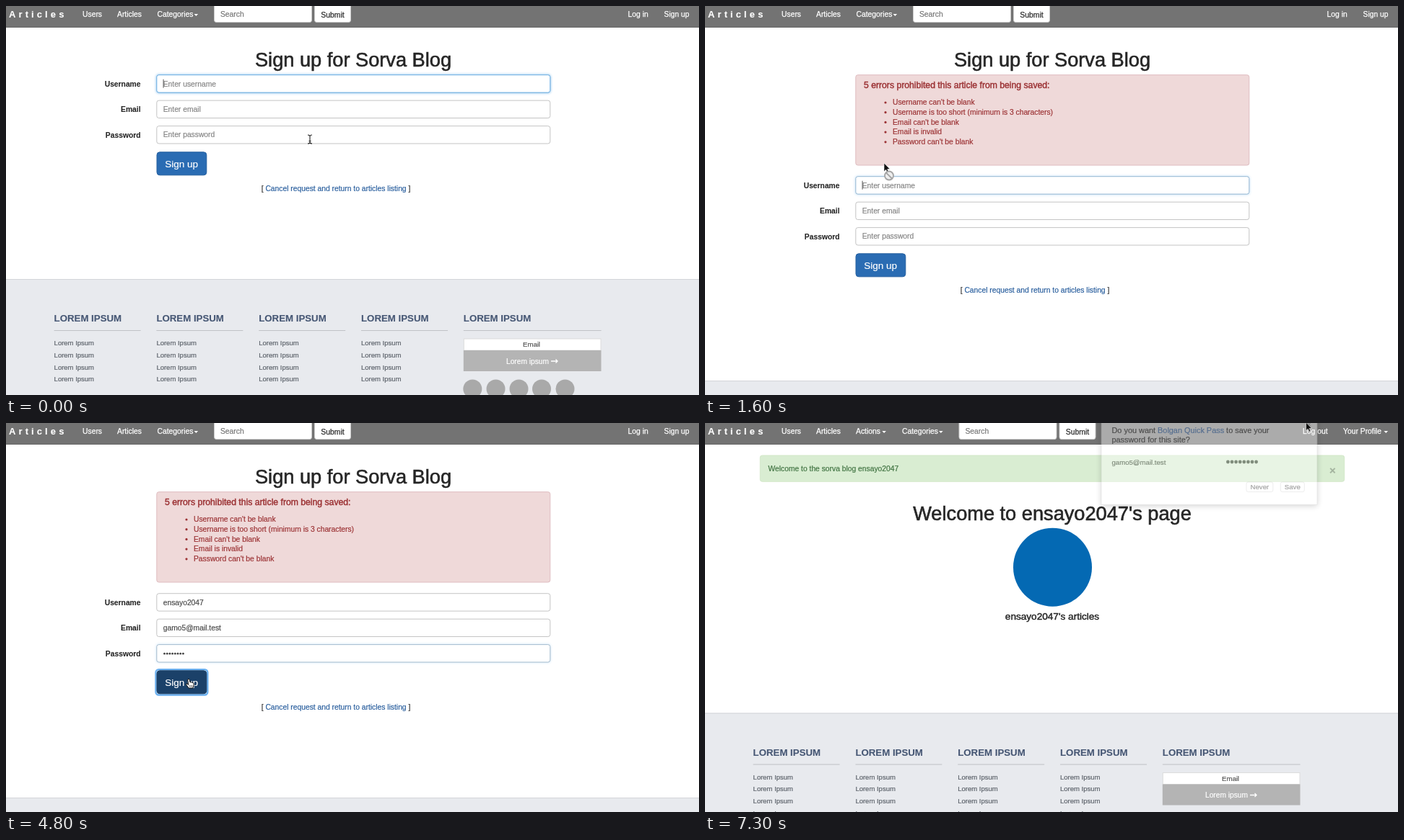
These frames come from a looping animation (960x540 px, 7.4 s). An HTML page:

```html
<!DOCTYPE html>
<html lang="en">
<head>
<meta charset="utf-8">
<title>Sign up</title>
<style>
html, body { margin: 0; width: 100%; height: 100%; overflow: hidden; background: #fff; }
svg { display: block; width: 960px; height: 540px; font-family: "Liberation Sans", Arial, sans-serif; font-size: 10.3px; }
</style>
</head>
<body>
<svg id="stage" viewBox="0 0 960 540"></svg>
<script>
const LOOP = 7400, STEP = 100;
const ERRORS_AT = 1500, PROFILE_AT = 5100, POPUP_AT = 5200;
const USER = 'ensayo2047', MAIL = 'gamo5@mail.test', BLOG = 'Sorva Blog';
const stage = document.getElementById('stage');
const $ = id => document.getElementById(id);

// A thin outline in the fill colour gives the type its weight
const ink = (color, weight = .2) => `fill="${color}" stroke="${color}" stroke-width="${weight}"`;
const text = (x, y, s, color = '#333', attrs = '', weight) => `<text x="${x}" y="${y}" ${ink(color, weight)} ${attrs}>${s}</text>`;
const rect = (x, y, w, h, fill, attrs = '') => `<rect x="${x}" y="${y}" width="${w}" height="${h}" fill="${fill}" ${attrs}/>`;
const group = (id, body, attrs = '') => `<g id="${id}" ${attrs}>${body}</g>`;
const dots = (x, y, step, r, fill, count = 8) => Array.from({ length: count }, (_, i) =>
  `<circle cx="${x + i * step}" cy="${y}" r="${r}" fill="${fill}"/>`).join('');
const heading = (x, y, s, size, color = '#262626', anchor = 'middle') =>
  text(x, y, s, color, `font-size="${size}" text-anchor="${anchor}"`, size > 20 ? .6 : .45);

const navLink = (x, s) => text(x, 15, s, '#fff', 'font-size="10.35"', .25);
const caretDown = x => `<path d="M${x} 11h5.6l-2.8 3z" fill="#fff"/>`;
const search = x =>
  rect(x + .5, -4, 135, 26.6, '#fff', 'rx="3" stroke="#ccc"') + text(x + 9, 15, 'Search', '#777') +
  rect(x + 139.5, -4, 50, 26.6, '#fff', 'rx="3" stroke="#ccc"') +
  text(x + 164.5, 16, 'Submit', '#2c2c2c', 'text-anchor="middle" font-size="10.4"', .25);

const navBar =
  rect(0, 0, 960, 29.5, '#737373') + rect(0, 29, 960, 1, '#666') +
  text(4, 16.3, 'Articles', '#fff', 'font-size="13" font-weight="bold" letter-spacing="4.1"', .1) +
  navLink(106, 'Users') + navLink(154, 'Articles');
const guestNav = navLink(209.5, 'Categories') + caretDown(260.5) + search(288) +
  navLink(861.5, 'Log in') + navLink(911.5, 'Sign up');
const memberNav = navLink(209, 'Actions') + caretDown(245.3) + navLink(273, 'Categories') + caretDown(324) +
  search(351.5) + navLink(828, 'Log out') + navLink(884, 'Your Profile') + caretDown(940.5);

const fieldY = i => 95.7 + i * 35.45;
const field = (label, hint, i) => {
  const y = fieldY(i);
  const box = fill => `x="208.8" y="${y}" width="545" height="24.4" rx="3" fill="${fill}"`;
  return text(186.5, y + 16, label, '#262626', 'font-weight="bold" text-anchor="end"', .1) +
    `<rect ${box('#fff')} stroke="#c4c4c4"/>` +
    group('glow' + i, `<rect ${box('none')} stroke="#66afe9" stroke-width="2.6" opacity=".6" filter="url(#soft)"/>` +
      `<rect ${box('#fff')} stroke="#6cb0e6"/>`) +
    text(217.7, y + 15.8, hint, '#858585', `id="hint${i}"`) +
    (i < 2 ? text(217.7, y + 15.8, '', '#4a4a4a', `id="value${i}"`) : group('value2', ''));
};
const form =
  field('Username', 'Enter username', 0) + field('Email', 'Enter email', 1) + field('Password', 'Enter password', 2) +
  rect(217.6, 0, .9, 12, '#444', 'id="caret"') +
  rect(207.5, 201.3, 71.8, 35.2, 'none', 'id="ring" rx="4" stroke="#69afef" stroke-width="2.4"') +
  rect(209, 202.8, 68.8, 32, '#2a6cb3', 'id="button" rx="4" stroke="#245f9f"') +
  text(243.2, 223.5, 'Sign up', '#fff', 'font-size="13.5" text-anchor="middle"') +
  text(353.7, 256.5, `[ <tspan ${ink('#2a5f9e')}>Cancel request and return to articles listing</tspan> ]`);

const problems = ["Username can't be blank", 'Username is too short (minimum is 3 characters)',
  "Email can't be blank", 'Email is invalid', "Password can't be blank"];
const errors = rect(208.8, 95.7, 545, 125.3, '#efd9d9', 'rx="3" stroke="#dfbcc0"') +
  heading(220, 114, '5 errors prohibited this article from being saved:', 12.2, '#9c3335', 'start') +
  problems.map((s, i) => `<circle cx="250" cy="${134 + i * 13.7}" r="1.6" fill="#9c3335"/>` +
    text(260, 137.2 + i * 13.7, s, '#9c3335')).join('');

const profile = rect(76.3, 45, 809.4, 36.3, '#d9edd2', 'rx="3" stroke="#d4e8ca"') +
  text(87.5, 67, `Welcome to the ${BLOG.toLowerCase()} ${USER}`, '#3f7240') +
  text(869.5, 70.5, '×', '#a3b39e', 'font-size="15" font-weight="bold" text-anchor="middle"') +
  heading(481, 134.7, `Welcome to ${USER}'s page`, 27.2) +
  '<circle cx="481.5" cy="200.2" r="54.5" fill="#0469b3"/>' +
  heading(481, 273, `${USER}'s articles`, 13.6);

const column = i => {
  const x = 66.6 + i * 141.8;
  return text(x, 438, 'LOREM IPSUM', '#465774', 'font-size="13.25" font-weight="bold"', .1) +
    rect(x, 450, i < 4 ? 120 : 190.8, 1, '#c0c2c6') +
    (i < 4 ? [0, 1, 2, 3].map(k => text(x, 471.2 + k * 16.65, 'Lorem Ipsum', '#5d636b', 'font-size="9.5"')).join('') : '');
};
const footer = rect(0, 379, 960, 300, '#e8eaee') + rect(0, 379, 960, 1, '#d3d5d9') +
  [0, 1, 2, 3, 4].map(column).join('') +
  rect(634.3, 462, 189.7, 16, '#fff', 'stroke="#dcdcdc"') +
  text(728, 473.3, 'Email', '#555', 'font-size="9.6" text-anchor="middle"') +
  rect(633.8, 478, 190.7, 29, '#b4b4b4') +
  text(693, 496.7, 'Lorem ipsum', '#fff', 'font-size="10.2"') +
  '<path d="M755 493h9m-2.5-2.5l2.5 2.5-2.5 2.5" stroke="#fff" stroke-width="1.3" fill="none"/>' +
  [646.3, 678.5, 710.5, 742, 774.5].map(x => `<circle cx="${x}" cy="531.5" r="13" fill="#a9a9a9"/>`).join('');

const popupButton = (x, w, s) => rect(x, 82, w, 13.6, '#fff', 'rx="2.5" stroke="#c8c8c8" stroke-width=".8"') +
  text(x + w / 2, 92.2, s, '#1a1a1a', 'font-size="9.6" text-anchor="middle"');
const popup = rect(549, -20, 299, 135, '#000', 'opacity=".45" filter="url(#shade)"') +
  rect(549, -10, 299, 123.3, '#fff', 'stroke="#bbb" stroke-width=".7"') +
  text(563.5, 14, `Do you want <tspan ${ink('#2a66b8')}>Bolgan Quick Pass</tspan> to save your`, '#111', 'font-size="10.9"') +
  text(563.5, 27.3, 'password for this site?', '#111', 'font-size="10.9"') +
  text(563.5, 57.7, MAIL, '#000', 'font-size="9.6"') + dots(724.4, 54, 5.6, 2.4, '#000') +
  popupButton(750, 36.8, 'Never') + popupButton(797.3, 33, 'Save') +
  '<path d="M834-.5l5 5m0-5l-5 5" stroke="#666"/>';

const pointer =
  group('arrow', '<path d="M0 0V11.8L2.7 9.2 4.4 13.2 6.4 12.4 4.7 8.5H8.2Z" fill="#111" stroke="#fff" stroke-width=".6"/>') +
  group('hand', '<path d="M-1.2 1.2Q0-.9 1.2 1.2L2 5 3.5 4.7 4.6 5.4 5.8 5.5 7 6.5V9.2L5.8 13H.2L-3.4 8.2Q-3.6 6.5-1.8 7L-.3 8.6Z" fill="#fff" stroke="#111" stroke-linejoin="round"/>' +
    '<path d="M1.6 9v2.4M3.2 9v2.4M4.8 9v2.4" stroke="#111" stroke-width=".6"/>') +
  group('beam', '<path d="M-3-6Q0-6 0-4Q0-6 3-6M0-4.5V4.5M-3 6Q0 6 0 4Q0 6 3 6M-1.5 2.5h3" fill="none" stroke="#222" stroke-width="1.1"/>') +
  group('denied', '<circle cx="7" cy="17.5" r="6" fill="#eee" stroke="#a5a5a5" stroke-width="1.8"/><path d="M3 13.5l8 8" stroke="#a5a5a5" stroke-width="1.8"/>');

stage.innerHTML =
  `<defs><filter id="soft" x="-5%" y="-50%" width="110%" height="200%"><feGaussianBlur stdDeviation="1.8"/></filter>
  <filter id="shade" x="-10%" y="-20%" width="120%" height="150%"><feGaussianBlur stdDeviation="4"/></filter></defs>` +
  rect(0, 0, 960, 540, '#fff') + group('footer', footer) + navBar +
  group('guest', guestNav + heading(481, 84, `Sign up for ${BLOG}`, 27.2) + group('errors', errors) + group('form', form)) +
  group('member', memberNav + profile) + group('popup', popup) + group('pointer', pointer);

const show = (id, on) => $(id).style.display = on ? '' : 'none';
const clamp = v => Math.max(0, Math.min(1, v));
const within = (t, a, b) => t >= a && t < b;

// Pointer stops: time, x, y
const stops = [[100, 421, 185], [800, 248, 218], [4000, 248, 218], [4700, 253, 355],
  [5000, 253, 355], [5400, 264.7, 332], [5700, 264.7, 332], [7100, 832.5, -1]];
function pointerAt(t) {
  const n = stops.findIndex(s => s[0] >= t);
  if (n === 0) return stops[0].slice(1);
  if (n < 0) return stops[stops.length - 1].slice(1);
  const [a, b] = [stops[n - 1], stops[n]];
  const u = (t - a[0]) / (b[0] - a[0]), e = u * u * (3 - 2 * u);
  return [a[1] + (b[1] - a[1]) * e, a[2] + (b[2] - a[2]) * e];
}

// Typing spans for the three fields
const typing = [[1700, 2300], [2400, 3000], [3100, 3600]];
const typed = (i, len, t) => Math.round(len * clamp((t - typing[i][0]) / (typing[i][1] - typing[i][0])));

function drawForm(t, x, y) {
  const drop = t >= ERRORS_AT ? 141 : 0, ly = y - drop;
  const values = [USER.slice(0, typed(0, USER.length, t)), MAIL.slice(0, typed(1, MAIL.length, t))];
  const count = typed(2, 8, t);
  values.forEach((s, i) => { $('value' + i).textContent = s; show('hint' + i, !s); });
  $('value2').innerHTML = dots(219.5, fieldY(2) + 12.6, 3.7, 1.35, '#444', count);
  show('hint2', !count);

  const focus = t < 2350 ? 0 : t < 3050 ? 1 : 2;
  for (let i = 0; i < 3; i++) {
    let glow = i === focus ? 1 : 0;
    if (i === 0 && within(t, ERRORS_AT, 1700)) glow = .5;
    if (i === 2 && t > 3600) glow = .35;
    $('glow' + i).style.opacity = glow;
  }
  const end = focus < 2 ? (values[focus] ? $('value' + focus).getComputedTextLength() : 0) : count * 3.7;
  $('caret').setAttribute('x', 217.6 + end);
  $('caret').setAttribute('y', fieldY(focus) + 6);
  show('caret', t < 3650);

  const onButton = within(x, 208, 279) && within(ly, 202, 236);
  const onField = within(x, 208, 755) && [0, 1, 2].some(i => within(ly, fieldY(i), fieldY(i) + 25));
  const pressed = within(t, 1200, ERRORS_AT) || within(t, 4700, PROFILE_AT);
  $('button').setAttribute('fill', pressed ? '#1b4169' : onButton ? '#205389' : '#2a6cb3');
  $('button').setAttribute('stroke', onButton ? '#1a3f66' : '#245f9f');
  show('ring', pressed);
  show('errors', drop);
  $('form').setAttribute('transform', `translate(0 ${drop})`);
  return onButton ? 'hand' : onField ? 'beam' : 'arrow';
}

function draw(t) {
  const [x, y] = pointerAt(t), member = t >= PROFILE_AT;
  const kind = member ? 'arrow' : drawForm(t, x, y);
  show('guest', !member);
  show('member', member);
  show('popup', t >= POPUP_AT);
  $('popup').style.opacity = t >= 7300 ? .4 : 1;
  $('footer').setAttribute('transform', `translate(0 ${member ? 23.5 : t >= ERRORS_AT ? 141 : 0})`);
  for (const k of ['arrow', 'hand', 'beam']) show(k, k === kind);
  show('denied', within(t, ERRORS_AT, 1700));
  show('pointer', !within(t, 1700, 4000));
  $('pointer').setAttribute('transform', `translate(${x} ${y})`);
}

const start = performance.now();
function tick() {
  const t = (performance.now() - start) % LOOP;
  draw(Math.floor(t / STEP) * STEP);
  requestAnimationFrame(tick);
}
tick();
</script>
</body>
</html>
```
